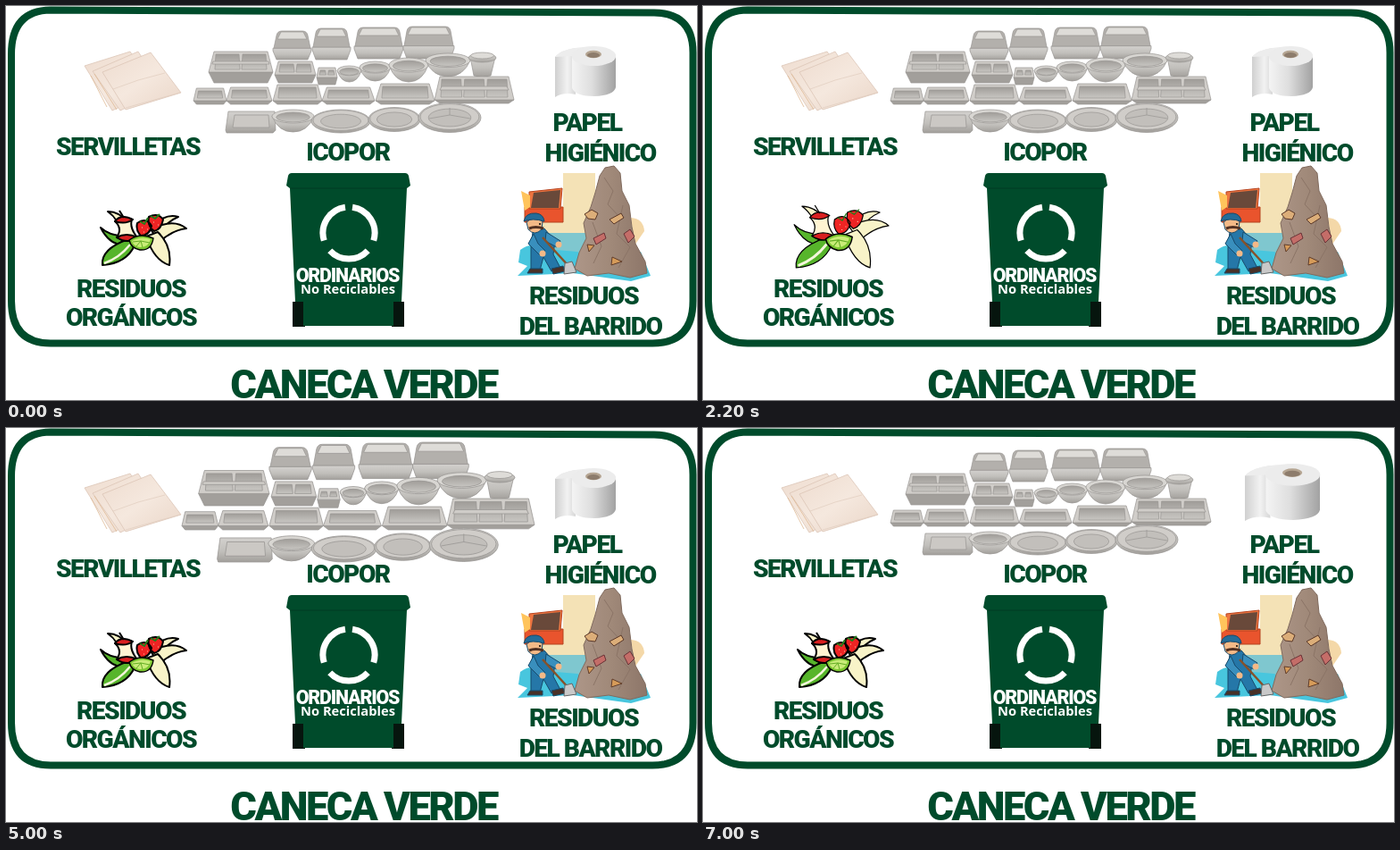
These frames come from a looping animation (774x441 px, 8 s). An HTML page:

```html
<!DOCTYPE html>
<html lang="es">
<head>
<meta charset="utf-8">
<title>Caneca verde</title>
<style>
  html, body { margin: 0; width: 100%; height: 100%; overflow: hidden; background: #fff; }
  svg { display: block; width: 774px; height: 441px; }
  text { font: 900 28.2px Roboto, sans-serif; letter-spacing: -.055em; text-anchor: middle; fill: #004b2b; }
  .title { font-size: 45.2px; }
  .bin text { fill: #fff; font-size: 21.4px; }
  .bin .small { font: 700 14.7px "Open Sans", sans-serif; letter-spacing: 0; }
</style>
</head>
<body>
<svg viewBox="0 0 774 441">
  <defs>
    <linearGradient id="foam" x2="0" y2="1">
      <stop stop-color="#d3d1ce"/><stop offset=".55" stop-color="#c1bfbb"/><stop offset="1" stop-color="#a29f9b"/>
    </linearGradient>
    <linearGradient id="hollow" x2="0" y2="1">
      <stop stop-color="#a09d99"/><stop offset="1" stop-color="#c8c6c2"/>
    </linearGradient>
    <linearGradient id="napkin" x2="1" y2="1">
      <stop stop-color="#eedccf"/><stop offset=".5" stop-color="#f5e8de"/><stop offset="1" stop-color="#ead6c8"/>
    </linearGradient>
    <linearGradient id="roll">
      <stop stop-color="#f4f4f4"/><stop offset=".45" stop-color="#dedede"/><stop offset="1" stop-color="#a2a2a2"/>
    </linearGradient>
    <linearGradient id="sheet">
      <stop stop-color="#d0d0d0"/><stop offset=".6" stop-color="#f2f2f2"/><stop offset="1" stop-color="#d6d6d6"/>
    </linearGradient>
    <linearGradient id="mound">
      <stop stop-color="#ad9688"/><stop offset=".5" stop-color="#a08979"/><stop offset="1" stop-color="#8d7669"/>
    </linearGradient>
  </defs>

  <path d="M50 4.5L726 7.5Q769.5 8 769.5 52V330Q769.5 377.5 724 377.5H50Q6 377.5 6 330V54Q6 5 50 4.5Z"
        fill="none" stroke="#004b2b" stroke-width="8"/>

  <g id="napkins" fill="url(#napkin)" stroke="#dcc6b6" stroke-width=".8">
    <path d="M88 67L139 51 168 94 119 117Z"/>
    <path d="M97 73L148 51 176 94 128 117Z"/>
    <path d="M95 78L113 113 M99 76L124 116" fill="none" stroke="#dfb995"/>
    <path d="M108 74L162 52 196 97 134 116Z"/>
    <path d="M120 93Q147 82 178 75M134 114L195 97" fill="none" stroke="#e2d0c2"/>
  </g>

  <g id="foamware" stroke="#999693" stroke-width=".7"></g>

  <g id="paper">
    <path d="M615 57Q622 49 638 47V99Q624 96 615 102Z" fill="url(#sheet)"/>
    <path d="M634 56V92Q638 101 659 101 681 100 683 91V56Z" fill="url(#roll)"/>
    <path d="M615 57Q623 46 657 45.5 640 47 635 56Z" fill="#ededed"/>
    <ellipse cx="658.5" cy="56" rx="24.7" ry="11" fill="#ececec"/>
    <ellipse cx="658" cy="54" rx="9" ry="4.3" fill="#b5a592"/>
    <ellipse cx="658" cy="55" rx="7" ry="3" fill="#8d7c6c"/>
  </g>

  <g id="organics" stroke="#000" stroke-width="2" stroke-linejoin="round">
    <path d="M114 230Q127 230 138 243L129 256Q127 239 114 230Z" fill="#f8f3c8"/>
    <path d="M106 248Q119 260 141 256L143 265Q119 274 106 248Z" fill="#57b52b"/>
    <path d="M166 245Q179 232 193 236 181 241 174 252Z" fill="#f8f3c8"/>
    <path d="M162 250Q188 237 202 249 186 251 172 264Z" fill="#f8f3c8"/>
    <path d="M157 258L170 253Q186 268 183 290 166 285 157 258Z" fill="#f8f3c8"/>
    <path d="M108 290Q106 272 137 261L144 268Q135 288 108 290Z" fill="#57b52b"/>
    <path d="M110 288Q127 282 139 267" fill="none" stroke="#f4f6dc" stroke-width="2.5"/>
    <path d="M122 241Q129 233 141 239 138 248 147 259 136 267 124 259 131 249 122 241Z" fill="#fff4d2"/>
    <path d="M122 241Q129 232 142 239 134 245 122 241ZM124 259Q135 253 147 259 137 267 124 259Z" fill="#d92020"/>
    <path d="M132 237L127 229" fill="none"/>
    <path d="M147 243Q157 236 163 246 161 257 151 257 145 251 147 243ZM160 236Q170 231 176 239 174 250 166 252 158 246 160 236Z" fill="#ee2424"/>
    <path d="M150 241L155 244 159 237M162 235L167 238 172 233" fill="none" stroke="#247d19"/>
    <path d="M152 248h1M158 250h1M154 253h1M165 242h1M170 245h1" stroke="#ffc3a3" stroke-width="1"/>
    <path d="M138 262Q150 253 165 260 163 274 150 273 140 271 138 262Z" fill="#7cc731" stroke-width="1.4"/>
    <path d="M141 263Q151 257 162 261 160 270 150 270 143 269 141 263Z" fill="#c9ec78" stroke="none"/>
    <path d="M151 263L142 264M151 263L146 269M151 263L153 270M151 263L161 265" stroke="#64ad25" stroke-width="1"/>
  </g>

  <g id="sweeping" stroke-linejoin="round">
    <path d="M624 187H660V262H590V242H624Z" fill="#f4e2b6"/>
    <path d="M606 254H650V276H606Z" fill="#7fc7cf"/>
    <path d="M576 273Q589 263 604 272L640 275 661 290 711 275 722 302 700 308 635 299 573 302 584 291 574 287Z" fill="#48c6de"/>
    <path d="M700 237Q714 238 715 252L704 268Z" fill="#f4d8a8"/>
    <path d="M581 225H624V242H581Z" fill="#e9542d" stroke="#b5431f"/>
    <path d="M586 208L623 204 621 227H586Z" fill="#ed7440" stroke="#b5431f"/>
    <path d="M588 226L591 209 621 206 619 226Z" fill="#69493a"/>
    <path d="M577 207L587 212V225L581 229Z" fill="#ffc45c"/>
    <path d="M665 190L671 181 681 179 688 187 690 207 698 223 701 247 705 266 716 286 718 299 699 304 675 299 651 302 637 294 642 276 650 260 647 243 655 225 660 209Z" fill="url(#mound)" stroke="#806a5d"/>
    <path d="M670 192L680 207 674 222 689 238M657 242L667 269 658 288M691 223L684 255 699 270 686 293" fill="none" stroke="#8b7466"/>
    <path d="M648 233L656 228 663 232 660 239 652 238ZM676 239L689 232 692 237 681 244Z" fill="#dcae79" stroke="#5b3929"/>
    <path d="M658 260L670 254 672 260 661 267ZM692 255L699 250 704 258 697 265Z" fill="#c46d68" stroke="#693236"/>
    <path d="M651 267L659 268 653 275ZM679 281L690 286 678 290Z" fill="#d69b59" stroke="#603d2b"/>
    <g stroke="#174a6b">
      <path d="M590 253L603 249 615 263 613 278 621 293 611 297 602 281 598 296 588 295 588 270Z" fill="#2577a8"/>
      <path d="M591 255L585 266 598 279 604 274 596 266ZM605 253L621 263 617 270 604 263Z" fill="#398fbd"/>
      <path d="M587 294H601V299H584ZM611 294L624 291 626 297 613 300Z" fill="#493127"/>
      <path d="M583 242Q591 234 601 241L600 250Q592 258 585 250Z" fill="#f4b987"/>
      <path d="M580 241Q582 231 594 232 602 233 603 241 590 237 580 241Z" fill="#246c98"/>
    </g>
    <path d="M586 249Q593 246 602 249" fill="none" stroke="#513022" stroke-width="3"/>
    <circle cx="598" cy="244" r="1"/>
    <path d="M601 259L631 292" stroke="#875129" stroke-width="2.5"/>
    <path d="M626 288L634 286 639 298 625 300Z" fill="#c9c9c9" stroke="#666"/>
    <circle cx="601" cy="277" r="3.5" fill="#f4b987"/><circle cx="619" cy="267" r="3.5" fill="#f4b987"/>
  </g>

  <g class="bin">
    <path d="M321 331H335V359H321ZM432 331H446V359H432Z" fill="#06150e"/>
    <path d="M314 201L316 190Q317 187 320 187H447Q450 187 451 190L453 201 449 204 443 331H434V358H333V331H324L318 204Z" fill="#004b2b"/>
    <path d="M319 204H448" stroke="#003a22"/>
    <path id="arcs" fill="none" stroke="#fff" stroke-width="7"/>
    <text x="382.5" y="308.5">ORDINARIOS</text>
    <text x="383" y="322" class="small">No Reciclables</text>
  </g>

  <text x="136.5" y="167">SERVILLETAS</text>
  <text x="383" y="173">ICOPOR</text>
  <text x="651" y="140">PAPEL</text>
  <text x="665.5" y="174">HIGIÉNICO</text>
  <text x="140" y="325.5">RESIDUOS</text>
  <text x="140" y="358">ORGÁNICOS</text>
  <text x="647" y="334">RESIDUOS</text>
  <text x="654.5" y="368">DEL BARRIDO</text>
  <text x="400.5" y="439" class="title">CANECA VERDE</text>
</svg>
<script>
const byId = id => document.getElementById(id);
const shape = (d, fill = "url(#foam)") => `<path d="${d}" fill="${fill}"/>`;
const oval = (x, y, rx, ry, fill = "url(#foam)") =>
  `<ellipse cx="${x}" cy="${y}" rx="${rx}" ry="${ry}" fill="${fill}"/>`;

// Foam pieces are given by left, top, width and height.
function clamshell(x, y, w, h) {
  const lid = h * .6;
  return shape(`M${x} ${y + lid}H${x + w}V${y + lid + 3}L${x + w - 4} ${y + h}H${x + 4}L${x} ${y + lid + 3}Z`)
    + shape(`M${x + 1} ${y + lid}L${x + 4} ${y + 5}Q${x + 5} ${y} ${x + 10} ${y}H${x + w - 10}Q${x + w - 5} ${y} ${x + w - 4} ${y + 5}L${x + w - 1} ${y + lid}Z`, "#b3b0ac")
    + shape(`M${x + 9} ${y + 1}H${x + w - 9}L${x + w - 5} ${y + 9}H${x + 5}Z`, "#dedcd8");
}

function tray(x, y, w, h, cells = 1, depth = 4) {
  const rim = y + h - depth, slant = Math.min(6, w * .09);
  const step = (w - 2 * slant) / cells;
  let out = shape(`M${x} ${rim}H${x + w}L${x + w - slant} ${y + h}H${x + slant}Z`, "#a29f9b")
    + shape(`M${x + slant} ${y}H${x + w - slant}L${x + w} ${rim}H${x}Z`, "#d0cdc9");
  for (let i = 0; i < cells; i++) {
    const left = x + slant + i * step;
    out += shape(`M${left + 2} ${y + 3}h${step - 4}l1 ${h - depth - 6}h${-step + 2}Z`, "url(#hollow)");
  }
  return out;
}

function bowl(x, y, w, h) {
  const rx = w / 2, ry = h * .3, cx = x + rx, cy = y + ry;
  return shape(`M${x} ${cy}Q${x + w * .15} ${y + h} ${cx} ${y + h}Q${x + w * .85} ${y + h} ${x + w} ${cy}Z`)
    + oval(cx, cy, rx, ry, "#d8d6d2") + oval(cx, cy + 1, rx * .8, ry * .72, "url(#hollow)");
}

const plate = (x, y, rx, ry) =>
  oval(x, y, rx, ry) + oval(x, y - 1, rx * .94, ry * .87, "#d0cdc9") + oval(x, y, rx * .68, ry * .6, "#c2bfbb");

byId("foamware").innerHTML =
  clamshell(299, 28, 43, 32) + clamshell(343, 25, 43, 35) + clamshell(390, 24, 55, 35) + clamshell(445, 23, 57, 36)
  + tray(227, 51, 72, 35, 2, 12) + shape("M232 62H294L295 65H231Z", "#d0cdc9")
  + tray(301, 62, 46, 24, 2, 9) + tray(348, 69, 23, 19, 2, 8)
  + bowl(371, 67, 27, 18) + bowl(396, 62, 35, 22) + bowl(429, 58, 44, 27) + bowl(470, 53, 50, 26)
  + shape("M520 57L524 78Q533 81 543 78L548 57Z") + oval(533.5, 58, 15.5, 5) + oval(533.5, 55.5, 13, 3.5, "#dedcd8")
  + tray(210, 92, 37, 18) + tray(247, 91, 51, 19) + tray(299, 88, 55, 22) + tray(354, 91, 59, 19)
  + tray(414, 87, 66, 23) + tray(480, 79, 89, 30, 3) + shape("M488 90H561L563 94H486Z", "#cfccc8")
  + shape("M249 118H301L302 139 299 142H247L246 139Z") + shape("M256 122H294L295 136H254Z", "#cbc8c4")
  + bowl(298, 116, 47, 25) + plate(375, 129, 33, 13) + plate(435, 127, 29, 13.5) + plate(497, 125, 35, 16.5)
  + shape("M474 126L497 122 520 126M497 122V114", "none");

const arc = (from, to) => {
  const point = a => `${384 + 29 * Math.cos(a * Math.PI / 180)} ${254 + 29 * Math.sin(a * Math.PI / 180)}`;
  return `M${point(from)}A29 29 0 0 1 ${point(to)}`;
};
byId("arcs").setAttribute("d", arc(163, 262) + arc(278, 377) + arc(43, 137));

// Each group grows from one box to another: left, top, right, bottom.
const pulses = [
  { id: "organics", start: 1000, end: 3000, from: [105, 229, 202, 291], to: [101, 223, 208, 294] },
  { id: "napkins", start: 3000, end: 5000, from: [88, 51, 196, 117], to: [81, 47, 201, 125] },
  { id: "foamware", start: 5000, end: 7000, from: [210, 23, 569, 142], to: [197, 16, 592, 150] },
  { id: "paper", start: 7000, end: 8000, from: [615, 45, 683, 102], to: [607, 40, 691, 104] }
];

function fit([x, y, right, bottom], [toX, toY, toRight, toBottom]) {
  const sx = (toRight - toX) / (right - x), sy = (toBottom - toY) / (bottom - y);
  return `matrix(${sx} 0 0 ${sy} ${toX - x * sx} ${toY - y * sy})`;
}

const began = performance.now();
function draw() {
  const t = (performance.now() - began) % 8000;
  for (const { id, start, end, from, to } of pulses) {
    const large = t >= start && t < end;
    byId(id).setAttribute("transform", large ? fit(from, to) : "");
    if (id === "organics") byId(id).setAttribute("stroke-width", large ? 1.1 : 2);
  }
  requestAnimationFrame(draw);
}
draw();
</script>
</body>
</html>
```
